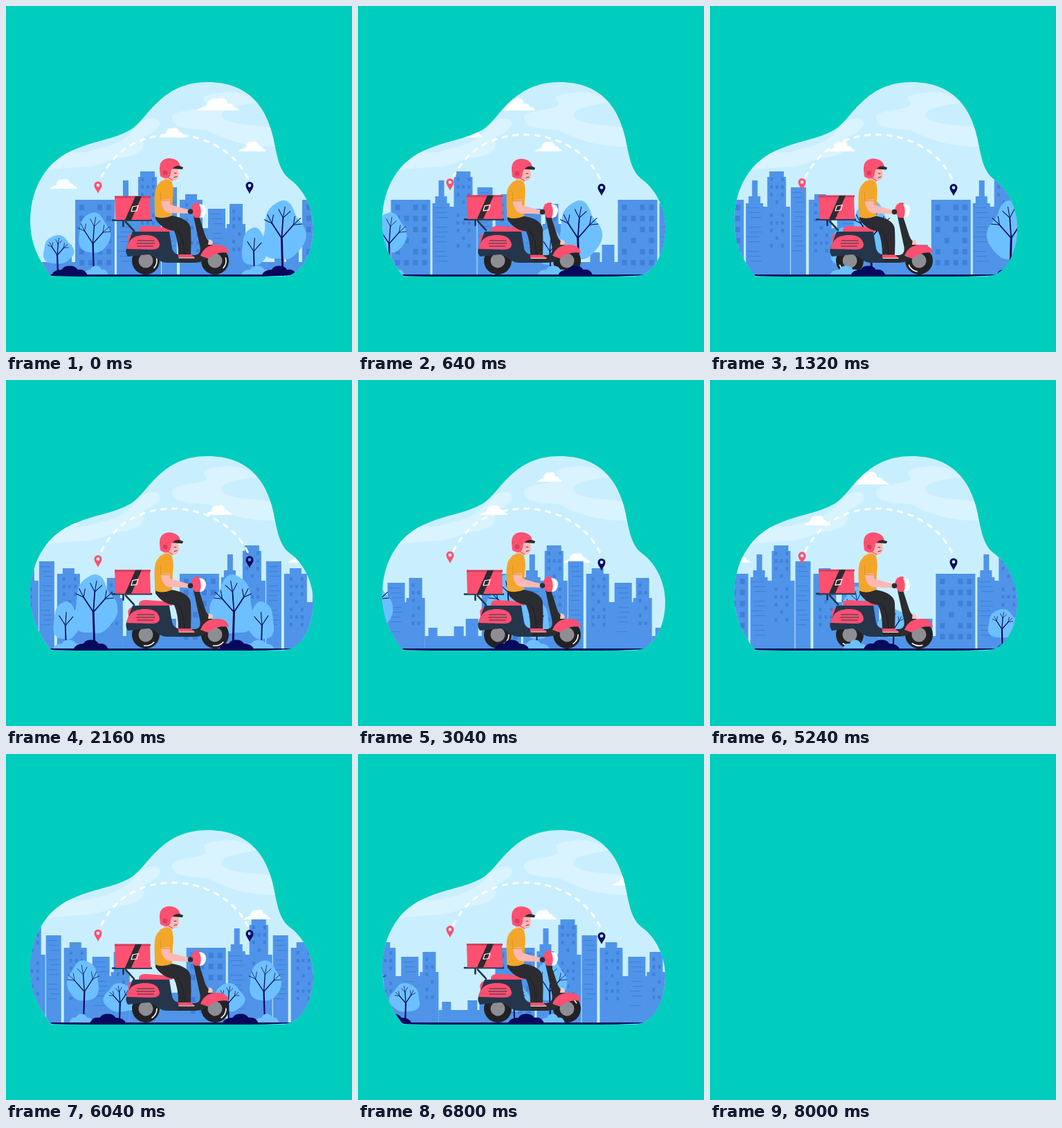
Animation of 500 by 500 pixels, one loop 8040 ms. Source, as an HTML page:

```html
<!DOCTYPE html>
<html lang="en">
<head>
<meta charset="utf-8">
<title>Scooter delivery</title>
<style>
  html, body { margin: 0; width: 100%; height: 100%; overflow: hidden; background: #00cdbd; }
  svg { display: block; width: 100vw; height: 100vh; }
  .line { fill: none; stroke-linecap: round; stroke-linejoin: round; }
  .red { fill: #fe5070; } .navy { fill: #06095c; } .leaf { fill: #6dc0ff; }
  .dark { fill: #2b2c31; } .slate { fill: #25364b; } .skin { fill: #ffb8b3; } .white { fill: #fff; }
  .shirt { fill: #f4a62b; } .rose { fill: #d63f5f; }
</style>
</head>
<body>
<svg viewBox="0 0 500 500">
  <defs>
    <clipPath id="blob"><path d="M65 390.500C45 365 35 340 35 312C35 258 62 222 100 207C130 194 164 191 184 176C206 160 226 110 291 110C350 110 376 145 386 190C392 218 395 240 411 251C430 265 444 292 444 320C444 360 425 390.500 400 390.500Z"/></clipPath>
    <path id="cloud" class="white" d="M-20 7Q-14 2-10 2C-10-5-4-8 0-6C5-9 9-5 9-1Q14-1 15 3Q18 3 20 7Z"/>
    <g id="wheel">
      <circle r="20" fill="#222226"/>
      <circle r="10.500" fill="#8d8e94"/>
      <path class="line" d="M15.500-4A16 16 0 0 1 12 10.500" stroke="#fff" stroke-width="1.600"/>
    </g>
    <path id="pin" fill-rule="evenodd" d="M0 9C-2 4-5.500 1-5.500-3A5.500 5.500 0 0 1 5.500-3C5.500 1 2 4 0 9ZM0-5.400A2.400 2.400 0 1 0 0-.6A2.400 2.400 0 1 0 0-5.400Z"/>
  </defs>

  <g id="scene">
    <g clip-path="url(#blob)">
      <rect x="30" y="105" width="420" height="290" fill="#c9efff"/>
      <g fill="#d9f4ff">
        <path d="M240 162C241 150 270 152 285 146C300 140 270 132 300 127Q340 118 362 140C340 143 305 148 312 160C318 172 360 172 390 176V203C350 204 320 195 292 180C272 177 239 178 240 162Z"/>
        <path d="M60 220C80 206 103 215 119 210C146 203 165 200 180 184Q200 158 218 163C228 168 220 180 205 186C190 192 206 201 192 211C176 222 162 216 146 225C123 237 70 230 45 242Z"/>
      </g>
      <g id="clouds"></g>
      <g id="city"></g>
      <g id="trees"></g>
    </g>

    <path class="line" d="M138 247C160 202 202 186 241 186C285 186 330 208 350 250" pathLength="33" stroke="#fff" stroke-width="3" stroke-dasharray=".8 1.2"/>
    <use id="pinFrom" href="#pin" fill="#fe5070"/>
    <use id="pinTo" href="#pin" class="navy"/>

    <use id="rear" href="#wheel"/>
    <use id="front" href="#wheel"/>

    <g id="box">
      <path class="line" d="M154 309.500H210M169.500 311V318M173 312L185 325" stroke="#25364b" stroke-width="2.600"/>
      <path class="red" d="M157 275H208L209 309H158Z"/>
      <path class="rose" d="M157 274.500H209V277.500H157Z"/>
      <path class="dark" d="M187 275H196L181 309H172Z"/>
      <path class="line" d="M183 290L191 288.500L189 296L181 297Z" stroke="#fff" stroke-width="1.200"/>
    </g>

    <g id="scooter">
      <path class="red" d="M182 328Q174 331 177 341L184 340Z"/>
      <path class="slate" d="M183 326H236L240 350Q242 360 256 360V371H232C221 371 217 361 206 359L176 362Q172 356 174 350Z"/>
      <path class="dark" d="M250 360H273Q283 359 280 346L271 304H279L288 332C291 341 299 343 301 350L288 367Q282 371 270 371H250Z"/>
      <path class="red" d="M174 351C177 337 185 331 202 331Q220 331 222 345Q222 352 211 352Z"/>
      <path class="line" d="M190 339H214M189 343H215M190 347H213" stroke="#25364b" stroke-width="1.200"/>
      <path class="red" d="M192 326Q191 317 203 318L234 320Q241 321 240 326Z"/>
      <path class="red" d="M281 361Q287 345 305 345Q320 345 322 357Q305 354 292 365Z"/>
      <path fill="#ffc8b9" d="M293 337Q301 339 298 345H292Z"/>
      <path class="red" d="M267 298Q267 283 279 284Q289 294 283 306H273Z"/>
      <path class="white" d="M279 286Q289 286 289 296Q288 306 280 306Q284 296 279 286Z"/>
    </g>

    <g id="rider">
      <path class="dark" d="M216 303H240C257 306 266 312 267 322Q268 340 267 360H249Q249 338 243 325Q226 323 216 308Z"/>
      <path class="line" d="M247 322Q257 332 258 359" stroke="#1e1e22" stroke-width="1"/>
      <path class="red" d="M249 359H267L273 363.500H249Z"/>
      <path class="line" d="M250 364H272" stroke="#fff" stroke-width="1"/>
      <path class="skin" d="M231 230H248L250 242Q250 253 240 252V258H227Z"/>
      <path class="line" d="M243 241.500H246M243 247.500L247 246.500" stroke="#56343d" stroke-width="1"/>
      <path class="shirt" d="M224 253Q236 248 240 255Q243 264 241 279L240 303Q226 309 215 304C216 292 212 270 218 260Z"/>
      <path class="skin" d="M224 280L237 279V287L266 295Q269 300 263 300L235 299Q225 296 224 280Z"/>
      <path class="line" d="M223 268L224 281H237" stroke="#dd9420" stroke-width="1"/>
      <path class="red" d="M222 237Q221 220 237 220Q250 221 252 232L239 236L237 246Q232 252 223 246Z"/>
      <path class="dark" d="M241 235Q246 228 256 233L255 236Z"/>
      <circle class="rose" cx="230" cy="241" r="3.500"/>
      <path class="line" d="M234 248L241 252" stroke="#d63f5f"/>
      <circle class="dark" cx="266.500" cy="297" r="3.800"/>
    </g>

    <g clip-path="url(#blob)"><g id="bushes"></g></g>
    <path class="navy" d="M64 388H413Q405 390.500 350 391H115Q80 390.500 66 390Z"/>
  </g>
</svg>

<script>
const $ = id => document.getElementById(id);
const LOOP = 8040, BLANK_AT = 8000, GROUND = 389;
const CITY_WIDTH = 328, CITY_PERIOD = 4000;
const NEAR_SPEED = 0.126, GROVE_WIDTH = NEAR_SPEED * 8000;

const range = n => [...Array(n).keys()];
const shift = (x, body) => `<g transform="translate(${x} 0)">${body}</g>`;
const rect = (x, y, w, h, fill) =>
  `<rect x="${x}" y="${y}" width="${w}" height="${h}" fill="${fill}"/>`;

// Skyline: every building stands on the ground and may carry a narrower top
const wall = (x, y, w) => rect(x, y, w, GROUND + 1 - y, '#4f94e8');
const pane = (x, y, w, h) => rect(x, y, w, h, '#4080da');
const tiers = (x, y, w, inset, rise) => wall(x, y, w) + wall(x + inset, y - rise, w - 2 * inset);

const panes = (x, y, cols, rows, step, size) => range(cols * rows).map(i => {
  const c = i % cols, r = Math.floor(i / cols);
  return (r * 5 + c * 3 + r * c) % 4 === 3 ? '' : pane(x + c * step, y + r * (step + 3), size, size + 1);
}).join('');

const slats = (x, y, w, rows) => range(rows).map(r =>
  r % 5 === 3 ? '' : pane(x + r % 3 * 2, y + r * 7, w - 4, 1.2)).join('');

const skyline =
  wall(99, 280, 57) + panes(105, 287, 4, 6, 13, 7)
  + tiers(159, 285, 25, 4, 10) + wall(168, 252, 8) + slats(161, 291, 21, 12)
  + tiers(190, 247, 27, 3, 8) + panes(194, 248, 3, 8, 8, 4)
  + wall(183, 290, 40) + panes(194, 300, 3, 5, 8, 4)
  + wall(224, 262, 22) + slats(226, 269, 18, 13)
  + tiers(250, 280, 33, 8, 8) + panes(258, 285, 3, 7, 8, 4)
  + wall(280, 321, 60) + wall(291, 293, 25) + slats(294, 300, 19, 10)
  + tiers(318, 315, 27, 4, 29) + panes(326, 294, 2, 6, 8, 4)
  + wall(345, 370, 83) + wall(350, 358, 13) + wall(387, 356, 14) + wall(404, 345, 18);

$('city').innerHTML = range(4).map(i => shift((i - 1) * CITY_WIDTH + 1, skyline)).join('');

// Trees: a wobbly oval crown and a trunk that forks
function crown(x, top, w, h, wobble) {
  const points = range(48).map(i => {
    const a = i / 48 * 2 * Math.PI;
    const r = 0.94 + wobble * Math.sin(3 * a + 0.6) + wobble / 2 * Math.cos(5 * a);
    return `${(x + w / 2 * r * Math.cos(a)).toFixed(1)} ${(top + h / 2 * (1 + r * Math.sin(a))).toFixed(1)}`;
  });
  return `<path class="leaf" d="M${points.join('L')}Z"/>`;
}

function branch(x, y, length, angle, width) {
  const tipX = x + length * Math.sin(angle), tipY = y - length * Math.cos(angle);
  const stroke = `<path class="line" d="M${x} ${y}L${tipX} ${tipY}" stroke="#06095c" stroke-width="${width}"/>`;
  if (width < 1.1) return stroke;
  return stroke + [-0.55, 0.1, 0.75].map(turn =>
    branch(tipX, tipY, length * (turn === 0.1 ? 0.55 : 0.48), angle + turn, width * 0.6)).join('');
}

const tree = (x, top, w, h, wobble) => crown(x, top, w, h, wobble)
  + branch(x, GROUND, (GROUND - top) * 0.5, -0.03, w / 22);

const bush = (x, w, tone) => `<path class="${tone}" d="M${x - w / 2} ${GROUND}`
  + `q${w * 0.05}-8 ${w * 0.28}-8a${w * 0.24} 9 0 0 1 ${w * 0.44} 0q${w * 0.2}-2 ${w * 0.28} 8Z"/>`;

const halfTrees = tree(75, 331, 46, 44, 0.07) + tree(127, 298, 48, 62, 0.06)
  + tree(359, 320, 40, 58, 0.07) + tree(400, 282, 64, 90, 0.1);
const halfBushes = bush(130, 36, 'leaf') + bush(92, 52, 'navy')
  + bush(363, 46, 'leaf') + bush(395, 50, 'navy');

// The grove is its first half followed by the mirror image
function plant(id, half) {
  const grove = half + `<g transform="translate(1000 0) scale(-1 1)">${half}</g>`;
  $(id).innerHTML = grove + shift(GROVE_WIDTH, grove);
}
plant('trees', halfTrees);
plant('bushes', halfBushes);

// Clouds drift in lanes, one lane per height
const clouds = (y, xs, w = 1, h = 1) => xs.map(x =>
  `<use href="#cloud" transform="translate(${x} ${y}) scale(${w} ${h})"/>`).join('');
$('clouds').innerHTML = clouds(142, [306, 888], 1.55, 1.3) + clouds(140, [660], 0.9)
  + clouds(183, [241, 1244]) + clouds(188, [579]) + clouds(203, [356, 815])
  + clouds(257, [83, 699]) + clouds(232, [1124]);

const move = (id, x, y, turn = 0) =>
  $(id).setAttribute('transform', `translate(${x} ${y}) rotate(${turn})`);
const swing = (t, period) => (1 - Math.cos(t / period * 2 * Math.PI)) / 2;

function draw(t) {
  $('scene').style.display = t >= BLANK_AT ? 'none' : '';
  for (const id of ['clouds', 'trees', 'bushes']) move(id, -t * NEAR_SPEED, 0);
  move('city', -t % CITY_PERIOD / CITY_PERIOD * CITY_WIDTH, 0);

  const sway = swing(t, 2000), bump = swing(t, 1000), turn = t / 1000 * 360;
  move('pinFrom', 133, 262 - 6 * sway);
  move('pinTo', 352, 262.5 + 4 * sway);
  move('rear', 202, 368, turn);
  move('front', 302, 368, turn);
  move('box', 0, -1.4 * bump);
  move('rider', 0, 0.8 * bump);
}

function tick(now) {
  draw(Math.floor(now % LOOP / 40) * 40);
  requestAnimationFrame(tick);
}
draw(0);
requestAnimationFrame(tick);
</script>
</body>
</html>
```
